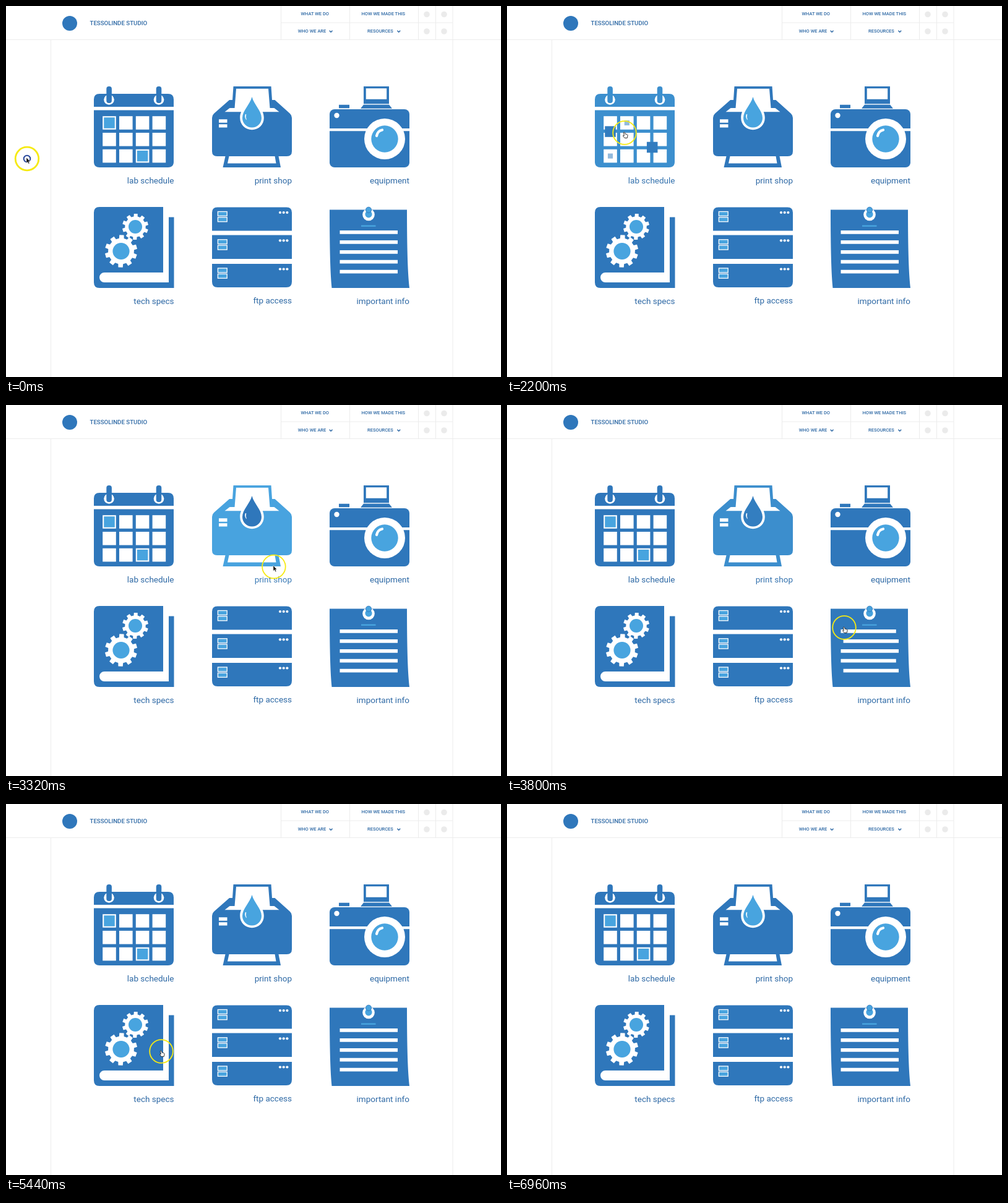
Recreate the animation shown at these times as an HTML page. Size 800 by 600 pixels, loop 7000 ms.

```html
<!DOCTYPE html>
<html lang="en">
<head>
<meta charset="utf-8">
<style>
html, body { margin: 0; width: 100%; height: 100%; overflow: hidden; background: #fff; }
svg { display: block; width: 800px; height: 600px; font-family: Roboto, sans-serif; }
.icon { --b: #2f77bb; --a: #48a4df; --t: #2e69a5; fill: var(--b); }
.a { fill: var(--a); }
.w { fill: #fff; }
.label { font-size: 13.5px; fill: var(--t); text-anchor: end; }
.nav { font-size: 7.5px; font-weight: 500; fill: #2e69a5; }
.brand { font-size: 9.7px; font-weight: 500; fill: #2e69a5; }
.rule { stroke: #ececec; fill: none; }
.arrow { stroke: #2e69a5; stroke-width: 1.5; fill: none; }
</style>
</head>
<body>
<svg viewBox="0 0 800 600">
  <path class="rule" d="M0 54.5H800M444.5 27H722M444.5 0V54M555.5 0V54M666.5 0V54M694.5 0V54M722 0V600M72.5 55V600"/>
  <circle cx="103" cy="28" r="12" fill="#2f77bb"/>
  <text class="brand" x="135.5" y="31">TESSOLINDE STUDIO</text>
  <g class="nav">
    <text x="476.5" y="14.7">WHAT WE DO</text>
    <text x="574.5" y="14.7">HOW WE MADE THIS</text>
    <text x="471.7" y="42.5">WHO WE ARE</text>
    <text x="584" y="42.5">RESOURCES</text>
  </g>
  <path class="arrow" d="M522.7 39.8l2.4 2.4 2.4-2.4M632.4 39.8l2.4 2.4 2.4-2.4"/>
  <g fill="#ebebeb">
    <circle cx="680" cy="13.5" r="4.8"/><circle cx="708" cy="13.5" r="4.8"/>
    <circle cx="680" cy="41" r="4.8"/><circle cx="708" cy="41" r="4.8"/>
  </g>

  <g class="icon" id="calendar">
    <path d="M142 163v-12q0-9 9-9h111q9 0 9 9v12zM142 168.5h129v83.5q0 9-9 9h-111q-9 0-9-9z"/>
    <circle class="w" cx="166.5" cy="151.5" r="8.3"/><circle class="w" cx="247" cy="151.5" r="8.3"/>
    <rect x="162.3" y="130" width="8.6" height="27" rx="4"/>
    <rect x="242.7" y="130" width="8.6" height="27" rx="4"/>
    <g id="cells" class="w"></g>
    <g id="days" class="a"></g>
    <text class="label" x="271.5" y="286.5">lab schedule</text>
  </g>

  <g class="icon" id="printer">
    <path d="M367.5 130H428.5L430 152H434.5L459 174Q462 177 462 181V235Q462 243 454 243H440.5L444 261H350.5L354.5 243H341Q333 243 333 235V181Q333 177 336 174L361 152H366z"/>
    <path class="w" d="M372 133.7H424L426.5 165H433.5L441.5 171.3H353.5L361.5 165H369.5zM360.5 243H434.5L436.5 254.5H358z"/>
    <path class="w" d="M397.5 139C402 156 416.8 165 416.8 181A19.3 19.3 0 0 1 378.2 181C378.2 165 393 156 397.5 139z"/>
    <path class="a" d="M397.5 147C401 160 413 169 413 181A15.5 15.5 0 0 1 382 181C382 169 394 160 397.5 147z"/>
    <path d="M386.8 175Q384.8 181 389 184.5Q387 180 388.2 175z" fill="#fff"/>
    <path class="w" d="M344 183.3h13.5v5.4h-13.5zM344 191.2h13.5v5.2h-13.5z"/>
    <text class="label" x="462" y="286.5">print shop</text>
  </g>

  <g class="icon">
    <path d="M578 130h41v29h-41zM578 159.5h41l5 6.3h-51zM538 159.8h17v5.5h-17z"/>
    <path class="w" d="M581.8 133.3h33.4v17.5h-33.4zM578 158.2h41v1h-41z"/>
    <rect x="523" y="167" width="129" height="94" rx="8"/>
    <path class="w" d="M523 198h129v4.3h-129z"/>
    <circle class="w" cx="534.5" cy="177" r="4.2"/>
    <circle class="w" cx="612" cy="215" r="33"/><circle class="a" cx="612" cy="215" r="21.7"/>
    <path d="M599 210Q600.5 202 608 200.5" fill="none" stroke="#fff" stroke-width="4.2" stroke-linecap="round"/>
    <text class="label" x="652" y="286.5">equipment</text>
  </g>

  <g class="icon" id="book">
    <path d="M151 325H254V431H263V341.5H271.5V456H151Q142 456 142 447V334Q142 325 151 325z"/>
    <path class="w" d="M254 341V431H159a8 8 0 0 0 0 16H263V341z"/>
    <path class="w" id="bigGear"/><circle class="a" cx="186" cy="396.5" r="13.6"/>
    <path class="w" id="smallGear"/><circle class="a" cx="209" cy="357" r="11"/>
    <text class="label" x="271.5" y="481.5">tech specs</text>
  </g>

  <g class="icon" id="server">
    <path d="M333 363.5V334q0-8.5 8.5-8.5h112q8.5 0 8.5 8.5v29.5zM333 370.5h129v38.5h-129zM333 417h129v29q0 9-9 9h-111q-9 0-9-9z"/>
    <g id="leds"></g>
    <text class="label" x="462" y="481">ftp access</text>
  </g>

  <g class="icon" id="note">
    <path d="M523 329.5H648Q648 425 652 456H526.5Q523 425 523 329.5z"/>
    <circle class="w" cx="586" cy="337.5" r="9.8"/>
    <circle class="a" cx="586" cy="336.8" r="5.6"/>
    <circle class="a" cx="586" cy="329.8" r="4.6" stroke="var(--b)" stroke-width=".9"/>
    <path class="a" d="M574 354.5h23.5v2.4h-23.5z"/>
    <path class="w" id="lines"/>
    <text class="label" x="652" y="481.5">important info</text>
  </g>

  <g id="pointer">
    <circle id="ring" r="18.8" fill="none" stroke="#f6ea12"/>
    <circle id="click" r="5.3" fill="none" stroke="#2b4a9c" stroke-width="2"/>
    <path id="arrow" d="M-1-2V7L1 5 2.5 8.3 4 7.6 2.6 4.5H5z" fill="#111" stroke="#fff" stroke-width=".5"/>
    <path id="hand" d="M-1.6-.5Q-.6-1.5.3-.4L1.2 2 4.3 2.8Q5.3 3.2 5 5L4.2 8.5H.2L-2.6 5Q-2.6 3.8-.6 4.6z" fill="#fff" stroke="#222" stroke-width=".9"/>
  </g>
</svg>
<script>
const $ = id => document.getElementById(id);
const LOOP = 7000, STEP = 40, PITCH = 26.8;
const DARK = [47, 119, 187], LIGHT = [72, 164, 223], TEXT = [46, 105, 165], TEXT_HOVER = [58, 122, 182];

// [time, x, y] stops of the mouse pointer
const PATH = [
  [0, 34, 247], [680, 190, 205], [2240, 190, 205], [2480, 338, 207], [2880, 372, 208],
  [3000, 372, 208], [3800, 545, 360], [4100, 545, 362], [4560, 431, 388], [4860, 428, 389],
  [5440, 251, 400], [5600, 251, 400], [6080, 23, 517], [6240, -25, 537]
];
// hover-in start and end, hover-out start and end
const HOVER = {
  calendar: [1900, 2480, 2735, 3320],
  printer: [2900, 3350, 3520, 4080],
  note: [3730, 4300, 4780, 5360],
  server: [4760, 5000, 5080, 5400],
  book: [5640, 5960, 6160, 6640]
};

const clamp = v => Math.min(1, Math.max(0, v));
const ease = v => { v = clamp(v); return v * v * (3 - 2 * v); };
const lerp = (a, b, p) => a + (b - a) * p;
const mix = (a, b, p) => `rgb(${a.map((v, i) => Math.round(lerp(v, b[i], p)))})`;
const cell = (col, row, size, opacity = 1) =>
  `<rect x="${167 + PITCH * col - size / 2}" y="${189 + PITCH * row - size / 2}" width="${size}" height="${size}" opacity="${opacity}"/>`;
const box = (x1, y1, x2, y2) => `M${x1} ${y1}H${x2}V${y2}H${x1}z`;

function gear(cx, cy, root, outer, teeth, turn) {
  const points = [];
  for (let i = 0; i < teeth; i++)
    for (const [offset, r] of [[-.3, root], [-.22, outer], [.22, outer], [.3, root]]) {
      const angle = (i + offset) / teeth * 2 * Math.PI + turn;
      points.push(`${(cx + r * Math.cos(angle)).toFixed(2)} ${(cy + r * Math.sin(angle)).toFixed(2)}`);
    }
  return `M${points.join('L')}z`;
}

function drawNote(p) {
  const narrow = clamp(p * 2), tall = clamp(p * 2 - 1);
  const right = lerp(633, 582, narrow), left = lerp(539.5, 589, narrow);
  const pair = y => box(539.5, y, right, y + lerp(5.7, 22, tall)) +
                    box(left, y + lerp(16, 0, tall), 633, y + 21.7);
  $('lines').setAttribute('d', pair(363) + box(539.5, 395, 633, 400.7) + pair(410.8));
}

function drawPointer(t) {
  const i = PATH.findIndex(stop => stop[0] > t);
  $('pointer').style.display = i < 0 ? 'none' : '';
  if (i < 0) return;
  const [t0, x0, y0] = PATH[i - 1], [t1, x1, y1] = PATH[i];
  const p = ease((t - t0) / (t1 - t0)), x = lerp(x0, x1, p), y = lerp(y0, y1, p);
  const inside = (v, spans) => spans.some(([a, b]) => v >= a && v <= b);
  const overIcon = inside(x, [[142, 271], [333, 462], [523, 652]]) && inside(y, [[130, 261], [325, 456]]);
  $('pointer').setAttribute('transform', `translate(${x} ${y})`);
  $('hand').style.display = overIcon ? '' : 'none';
  $('arrow').style.display = overIcon ? 'none' : '';
  $('click').style.opacity = 1 - clamp(t / 240);
  $('ring').setAttribute('stroke-width', lerp(2.8, 1.8, clamp(t / 240)));
}

function draw(t) {
  const hover = {};
  for (const [id, [a, b, c, d]] of Object.entries(HOVER)) {
    const p = hover[id] = ease((t - a) / (b - a)) - ease((t - c) / (d - c));
    const style = $(id).style;
    style.setProperty('--b', mix(DARK, LIGHT, p));
    style.setProperty('--a', mix(LIGHT, DARK, clamp(p * 1.7)));
    style.setProperty('--t', mix(TEXT, TEXT_HOVER, p));
  }
  const p = hover.calendar;
  $('days').innerHTML = cell(0, p, 17.5) + cell(2 + p, 2 - p, 17.5) +
    cell(1, 0, 15.5 * p, p) + cell(0, 2, 15.5 * p, p);
  const turn = hover.book * Math.PI / 2;
  $('bigGear').setAttribute('d', gear(186, 396.5, 21, 26.3, 10, .35 + turn));
  $('smallGear').setAttribute('d', gear(209, 357, 16.8, 21.2, 10, .35 - turn));
  drawNote(hover.note);
  drawPointer(t);
}

for (let i = 0; i < 12; i++) $('cells').innerHTML += cell(i % 4, Math.floor(i / 4), 21.6);
for (const y of [332, 377.3, 423.5]) {
  for (const dy of [.5, 9.8])
    $('leds').innerHTML += `<rect class="a" x="342.4" y="${y + dy}" width="14.8" height="7" stroke="#fff" stroke-width="1.3"/>`;
  for (const x of [443, 448.7, 454.4])
    $('leds').innerHTML += `<circle class="w" cx="${x}" cy="${y + 2}" r="2.1"/>`;
}

function frame() {
  draw(Math.floor(performance.now() % LOOP / STEP) * STEP);
  requestAnimationFrame(frame);
}
frame();
</script>
</body>
</html>
```
